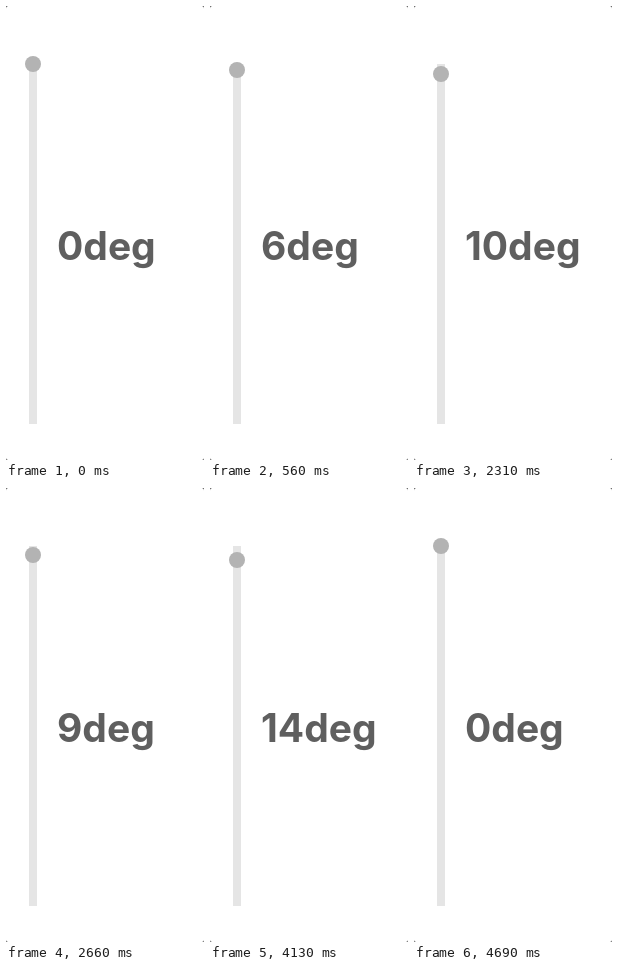
These frames come from a looping animation (198x454 px, 5.11 s). An HTML page:

```html
<!DOCTYPE html>
<html lang="en">
<head>
<meta charset="utf-8">
<title>Angle slider</title>
<style>
  html, body { margin: 0; width: 100%; height: 100%; overflow: hidden; background: #fff; }
  svg { display: block; width: 198px; height: 454px; }
  text { font: 700 39px Inter, "Liberation Sans", sans-serif; font-kerning: none; fill: #5f5f5f; }
</style>
</head>
<body>
<svg viewBox="0 0 198 454">
  <rect width="198" height="454" fill="#555"/>
  <rect width="198" height="454" rx="2.5" fill="#fff"/>
  <rect x="23" y="58" width="8" height="360" fill="#e5e5e5"/>
  <circle id="knob" cx="27" cy="58" r="8" fill="#b3b3b3"/>
  <text id="label" x="51" y="253.6">0deg</text>
</svg>
<script>
  const LOOP = 5110, STEP = 70, TRACK_TOP = 58, PEAK = 24;
  const knob = document.getElementById('knob');
  const label = document.getElementById('label');

  // The knob is dragged to `grip`, held, flicked to PEAK and eased back to zero.
  const pulls = [
    { start: 70, rise: 3, grip: 8, release: 350, end: 770 },
    { start: 2310, rise: 1, grip: 10, release: 2520, end: 2870 },
    { start: 4130, rise: 1, grip: 14, release: 4340, end: 4690 }
  ];

  function angleAt(time) {
    const now = Math.floor(time / STEP) * STEP;
    const pull = pulls.find(p => now >= p.start && now < p.end);
    if (!pull) return 0;
    if (now < pull.release) {
      const steps = (now - pull.start) / STEP + 1;
      return Math.round(pull.grip * Math.min(1, steps / pull.rise));
    }
    const left = (pull.end - now) / (pull.end - pull.release);
    return Math.round(PEAK * left ** 2);
  }

  function draw(time) {
    const angle = angleAt(time % LOOP);
    knob.setAttribute('cy', TRACK_TOP + angle);
    label.textContent = angle + 'deg';
  }

  const begin = performance.now();
  function tick() {
    draw(performance.now() - begin);
    requestAnimationFrame(tick);
  }
  tick();
</script>
</body>
</html>
```
